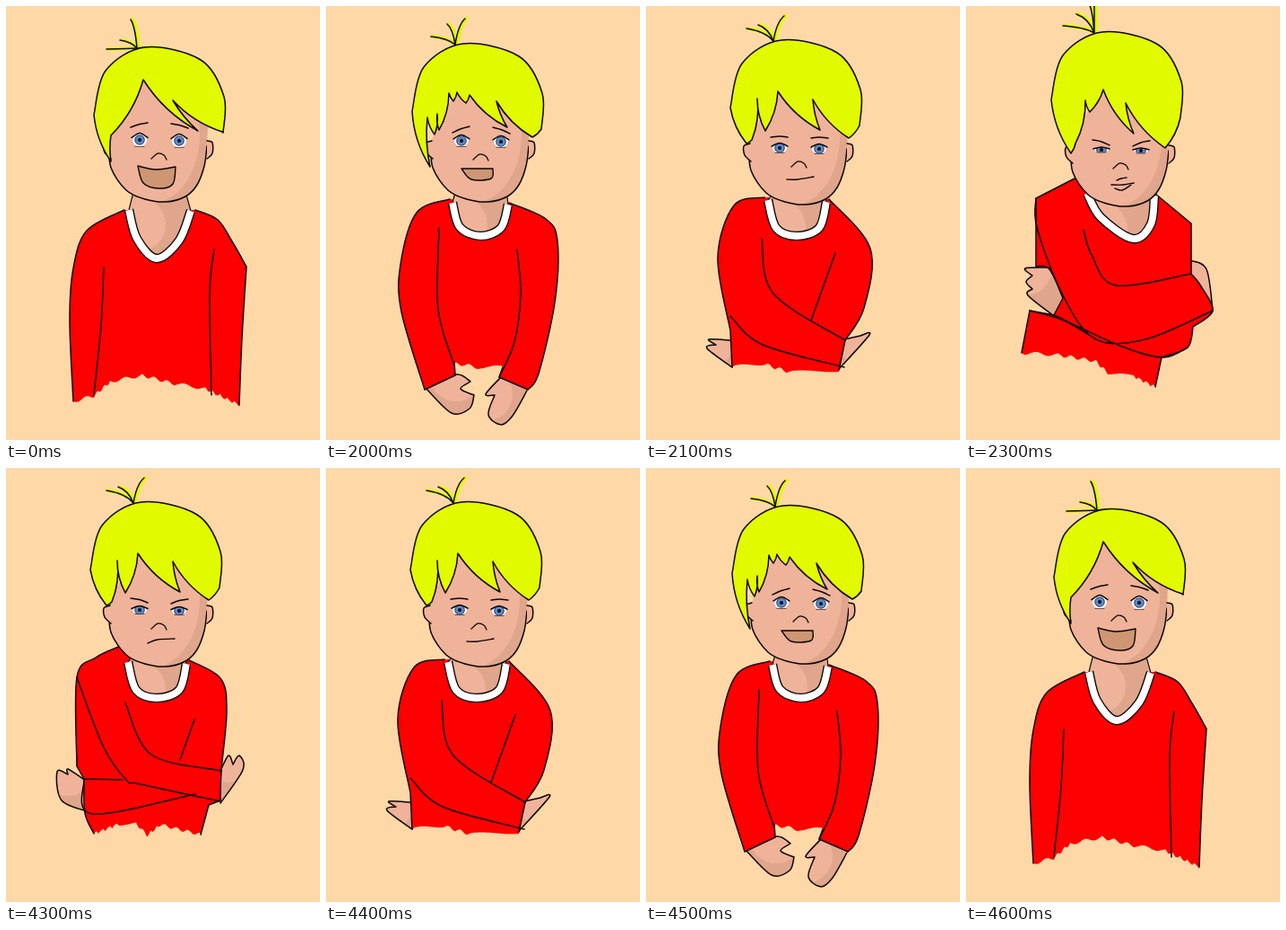
These frames come from a looping animation (350 px wide and 483 px high, 4.7 s). An HTML page with a canvas:

```html
<!DOCTYPE html>
<html lang="en">
<head>
<meta charset="utf-8">
<title>Crossing arms</title>
<style>
html, body { margin: 0; width: 100%; height: 100%; overflow: hidden; background: #ffd8a8; }
canvas { display: block; }
</style>
</head>
<body>
<canvas id="stage" width="350" height="483"></canvas>
<script>
const ctx = document.getElementById('stage').getContext('2d');
const PAPER = '#ffd8a8', RED = '#ff0000', HAIR = '#e2fa00', INK = '#0c0503', WHITE = '#ffffff';
const SKIN = '#efb39a', SHADE = '#dfa68c', MOUTH = '#ce9673';

const points = text => text.trim().split(/\s+/).map(p => p.split(',').map(Number));

// Smooth curve through "x,y" points. "|" is a corner, ";" a new subpath,
// "~" a ragged run, which is left out when bare is set.
function trace(text, bare) {
  const path = new Path2D();
  for (const sub of text.split(';')) {
    let last = null;
    for (const run of sub.split('|')) {
      const rough = run.includes('~');
      const pts = points(run.replace('~', ''));
      if (last) pts.unshift(last);
      else path.moveTo(...pts[0]);
      last = pts[pts.length - 1];
      if (rough && bare) path.moveTo(...last);
      else pts.slice(1).forEach((c, i) => {
        const b = pts[i], a = pts[i - 1] || b, d = pts[i + 2] || c;
        if (rough) fray(path, b, c);
        else path.bezierCurveTo(b[0] + (c[0] - a[0]) / 6, b[1] + (c[1] - a[1]) / 6,
          c[0] - (d[0] - b[0]) / 6, c[1] - (d[1] - b[1]) / 6, ...c);
      });
    }
  }
  return path;
}

function fray(path, [x0, y0], [x1, y1]) {
  const n = Math.ceil(Math.hypot(x1 - x0, y1 - y0) / 3);
  for (let i = 1; i <= n; i++) {
    const x = x0 + (x1 - x0) * i / n, y = y0 + (y1 - y0) * i / n;
    path.lineTo(x, y + 2 * Math.sin(x * 2.3 + y * 1.7));
  }
}

function stroke(path, color = INK, width = 1.5) {
  ctx.strokeStyle = color;
  ctx.lineWidth = width;
  ctx.stroke(path);
}

function fill(path, color) {
  ctx.fillStyle = color;
  ctx.fill(path);
}

function oval(x, y, rx, ry = rx) {
  const path = new Path2D();
  path.ellipse(x, y, rx, ry, 0, 0, 2 * Math.PI);
  return path;
}

function clipped(path, paint) {
  ctx.save();
  ctx.clip(path);
  paint();
  ctx.restore();
}

function at([x, y], paint) {
  ctx.save();
  ctx.translate(x, y);
  paint();
  ctx.restore();
}

// Skin in shadow, with a lit oval on one side.
function flesh(path, lit) {
  fill(path, SHADE);
  clipped(path, () => fill(lit, SKIN));
}

const JAW = '-57,-65 -55,-38 -38,-13 -17,-3 6,0 28,-6 41,-19 49,-40 52,-62';
const FOREHEAD = '| 53,-85 | 10,-115 | -20,-138 | -50,-85';
const EARS = '-56,-68 -63,-65 -62,-55 -55,-48; 52,-68 58,-66 58,-54 52,-48';
const DOME = '-74,75 -61,26 -17,0 45,14 71,55 70,95';

function eye(x, y, open, [outer, inner]) {
  const side = Math.sign(x);
  const ball = oval(x, y, 8, open);
  fill(ball, WHITE);
  clipped(ball, () => {
    fill(oval(x, y, 5.8), '#27446f');
    fill(oval(x, y, 4.8), '#5c8ac8');
    fill(oval(x, y, 2), INK);
  });
  stroke(trace(`${x - 9},${y - open / 3} ${x},${y - open} ${x + 9},${y - open / 3}`));
  stroke(trace(`${x - 5},${y + open} ${x + 5},${y + open}`), INK, 0.6);
  stroke(trace(`${x + side * 10},${y + outer} ${x},${y + (outer + inner) / 2 - 1} ${x - side * 9},${y + inner}`));
}

function face({ eyeY, open, brow, mouth, smiles }) {
  flesh(trace(JAW + FOREHEAD), oval(-10, -75, 54, 76));
  stroke(trace(JAW));
  fill(trace(EARS), SKIN);
  stroke(trace(EARS));
  eye(-23, eyeY, open, brow);
  eye(21, eyeY + 1, open, brow);
  stroke(trace('-10,0 -3,-6 4,-4 7,1'.replace(/,(-?\d+)/g, (_, y) => ',' + (+y + eyeY + 21))), INK, 1.3);
  if (smiles) fill(trace(mouth), MOUTH);
  stroke(trace(mouth), INK, 1.4);
}

function hair({ fringe, tuft }) {
  for (const [x, y] of points(tuft)) {
    const strand = new Path2D();
    strand.moveTo(-26, 1);
    strand.quadraticCurveTo(-26 + (x + 26) * 0.3, y * 0.75, x, y);
    at([2, 0], () => stroke(strand, HAIR, 4));
    stroke(strand);
  }
  const path = trace(DOME);
  let [x0, y0] = [70, 95];
  for (const [x, y] of points(fringe + ' -74,75')) {
    const dx = x - x0, dy = y - y0, bow = dx < 0 ? 0.13 : -0.08;
    path.quadraticCurveTo(x0 + dx / 2 + dy * bow, y0 + dy / 2 - dx * bow, x, y);
    [x0, y0] = [x, y];
  }
  fill(path, HAIR);
  stroke(path);
}

function body({ chin: [x, y], collar, shirt, folds, hands }) {
  for (const hand of hands.split(';').filter(Boolean)) {
    const path = trace(hand), [hx, hy] = points(hand.replace(/\|/g, ''))[1];
    flesh(path, oval(hx, hy, 30));
    stroke(path);
  }
  fill(trace(shirt), RED);
  stroke(trace(shirt, true));
  stroke(trace(folds));
  const neck = trace(`${collar} | ${x + 27},${y - 15} | ${x - 29},${y - 15} | ${collar.split(' ')[0]}`);
  flesh(neck, oval(x - 24, y + 25, 30));
  stroke(neck, INK, 1.1);
  ctx.lineCap = 'butt';
  stroke(trace(collar), INK, 10.5);
  stroke(trace(collar), WHITE, 7.8);
  ctx.lineCap = 'round';
}

function draw(pose) {
  ctx.fillStyle = PAPER;
  ctx.fillRect(0, 0, 350, 483);
  body(pose);
  at(pose.chin, () => face(pose));
  at(pose.crown, () => hair(pose));
}

// Face parts are relative to the chin, hair parts to the crown.
const happy = {
  chin: [172, 218], crown: [172, 46], eyeY: -69, open: 7.5, brow: [-14, -19], smiles: true,
  mouth: '-25,-40 -5,-36 17,-39 | 14,-20 -1,-15 -19,-21 -25,-40',
  fringe: '69,94 14,59 42,93 -19,36 -55,98 -55,127',
  tuft: '-60,2 -45,-8 -33,-31 -3,0',
  collar: '137,227 146,259 168,281 193,261 206,228',
  shirt: '132,227 90,250 75,292 71,350 75,440 |~ 98,434 116,418 152,411 190,421 220,425 260,444 | 263,370 268,290 | 252,262 236,238 211,227',
  folds: '109,291 106,355 98,433; 232,271 227,320 229,433',
  hands: ''
};

const shy = {
  chin: [174, 218], crown: [170, 42], eyeY: -68, open: 6.5, brow: [-9, -16], smiles: true,
  mouth: '-23,-37 12,-37 | 10,-26 -12,-25 -23,-37',
  fringe: '60,104 20,64 32,93 -10,57 -14,66 -24,54 -28,64 -33,55 -44,96 -46,78 -49,101 -57,82 -54,137',
  tuft: '-53,-8 -35,-22 -15,-28',
  collar: '141,219 149,246 172,256 195,247 203,221',
  shirt: '138,215 101,230 83,288 84,340 110,427 | 144,411 | 143,397 |~ 168,402 197,402 | 193,413 | 225,427 | 237,409 255,330 258,262 245,237 204,219',
  folds: '126,247 125,337 143,400; 213,271 217,320 210,374 193,413',
  hands: '111,425 145,410 161,418 | 150,426 165,433 | 160,448 140,453 111,425; 194,414 178,432 188,433 | 181,455 195,466 208,456 224,428'
};

const wary = {
  chin: [172, 221], crown: [168, 38], eyeY: -63, open: 4.5, brow: [-13, -8],
  mouth: '-14,-26 -3,-30 16,-31',
  fringe: '58,109 18,66 26,100 -21,57 -35,101 -44,65 -50,111 -56,115',
  tuft: '-56,-13 -43,-17 -14,-27',
  collar: '136,216 145,247 168,256 193,247 201,218',
  shirt: '128,198 100,211 79,233 79,332 | 87,346 | 88,384 98,407 |~ 126,396 145,395 157,409 172,397 217,408 | 226,375 | 239,370 | 240,337 246,270 239,234 204,214',
  folds: '79,233 108,309 134,347 150,352 239,371; 133,261 162,319 240,337; 87,346 130,347; 87,346 96,385 211,363; 210,280 194,325',
  hands: '86,346 69,335 69,341 | 57,338 62,370 94,383; 239,337 248,320 253,330 | 260,320 264,336 239,373'
};

const bending = {
  ...wary, open: 5.5, brow: [-12, -12],
  mouth: '-15,-28 -3,-28 15,-31',
  shirt: '132,213 98,222 80,280 94,361 | 96,402 |~ 130,398 162,408 215,405 | 222,372 | 243,336 250,270 204,215',
  folds: '94,345 130,377 221,402; 129,259 142,320 222,372; 211,275 184,350',
  hands: '95,372 70,371 78,377 | 68,381 96,402; 221,371 239,367 | 249,366 215,404'
};

const cross = {
  chin: [174, 223], crown: [169, 29], eyeY: -63, open: 3, brow: [-11, -5],
  mouth: '-12,-24 1,-24 13,-26; -6,-29 -1,-31 5,-32; -8,-20 0,-18 10,-24',
  fringe: '53,129 9,79 18,113 -16,64 -31,89 -36,76 -47,124 -52,135',
  tuft: '-61,-7 -46,-20 -32,-32 -26,-32',
  collar: '135,208 150,235 186,259 206,243 210,211',
  shirt: '121,192 78,214 | 78,290 | 93,293 108,325 | 98,344 | 71,339 | 62,386 |~ 100,388 144,395 160,410 187,412 211,424 | 218,391 | 247,380 253,357 | 275,339 262,312 251,298 | 251,242 | 211,209',
  folds: '78,214 79,246 106,318 143,370 200,371 275,339; 131,249 140,277 167,311 251,298; 98,344 174,379 220,391 247,380; 71,339 109,350 145,371',
  hands: '92,291 66,292 74,300 | 67,307 74,315 | 69,322 98,345 | 111,333; 249,283 268,293 275,339 | 249,310'
};

// Two held poses, with quick steps there and back.
const poses = [happy, shy, bending, wary, cross];
const HOLD = 2000, STEP = 100, LOOP = 4700;
const clamp = n => Math.max(0, Math.min(4, n));

function poseAt(t) {
  const there = clamp(1 + Math.floor((t - HOLD) / STEP));
  const back = clamp(1 + Math.floor((t - 2 * HOLD - 3 * STEP) / STEP));
  return poses[there - back];
}

const start = performance.now();
let shown;

function tick() {
  const pose = poseAt((performance.now() - start) % LOOP);
  if (pose !== shown) draw(shown = pose);
  requestAnimationFrame(tick);
}

ctx.lineCap = ctx.lineJoin = 'round';
tick();
</script>
</body>
</html>
```
